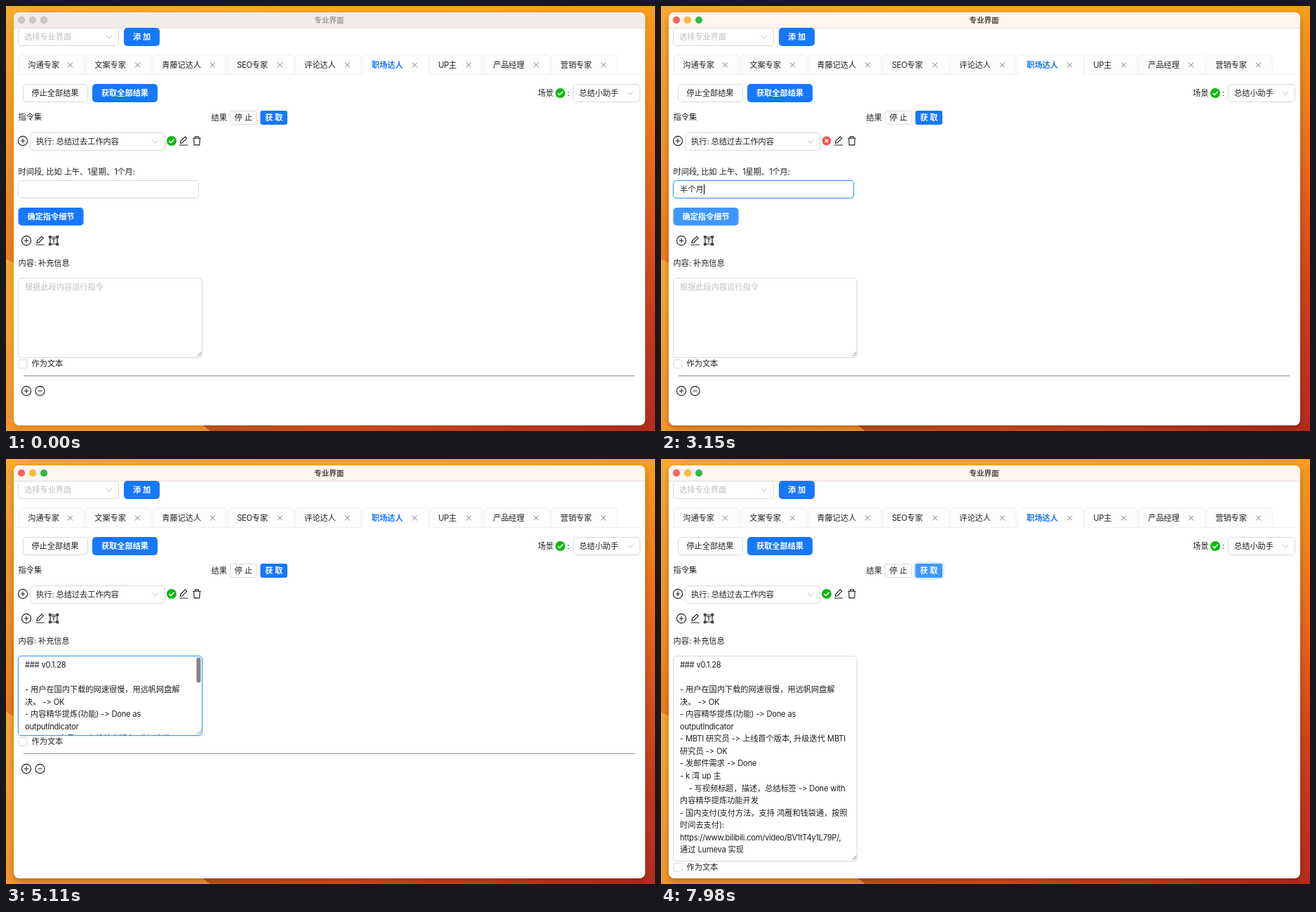
An HTML page for the animation above (8 s loop, 925 by 605 pixels).

```html
<!DOCTYPE html>
<html lang="zh-CN">
<head>
<meta charset="utf-8">
<style>
  html, body { margin: 0; width: 925px; height: 605px; overflow: hidden; background: #f5a02a; }
  svg { display: block; }
  text { font: 11.2px Inter, "Noto Sans CJK SC", sans-serif; fill: #1f1f1f; }
  .latin { letter-spacing: -.28px; }
  .mid { text-anchor: middle; }
  .bold { font-weight: 600; }
  .white { fill: #fff; }
  .hint { fill: #bfbfbf; }
  .blue { fill: #1677ff; }
  .box { fill: #fff; stroke: #d9d9d9; }
  .ring { fill: none; stroke: #0591ff; stroke-width: 4; opacity: 0; }
  .icon { fill: none; stroke: #1f1f1f; stroke-width: 1.15; }
  .grey { fill: none; stroke: #bfbfbf; }
</style>
</head>
<body>
<svg id="stage" width="925" height="605"></svg>
<script>
const PERIOD = 8000, STEP = 70;
const $ = id => document.getElementById(id);
const latin = s => s.replace(/[!-~]+/g, m => `<tspan class="latin">${m}</tspan>`);
// y is the middle of the line
const text = (x, y, s, cls = '', more = '') =>
  `<text x="${x}" y="${y + 4}" class="${cls}" ${more}>${latin(s)}</text>`;
const rect = (x, y, w, h, rx, attrs) =>
  `<rect x="${x}" y="${y}" width="${w}" height="${h}" rx="${rx}" ${attrs}/>`;
const box = (x, y, w, h, id = '', rx = 4.5) =>
  rect(x + .5, y + .5, w - 1, h - 1, rx, `class="box" id="${id}"`);
const ring = (x, y, w, h, id, rx = 4.5) =>
  rect(x + .5, y + .5, w - 1, h - 1, rx, `class="ring" id="${id}"`);
const button = (x, y, w, h, s, id = '', rx = 5) =>
  rect(x, y, w, h, rx, `class="blue" id="${id}"`) + text(x + w / 2, y + h / 2, s, 'mid bold white');
const path = (x, y, d, cls = 'icon') => `<path transform="translate(${x} ${y})" class="${cls}" d="${d}"/>`;
const chevron = (x, y) => path(x, y, 'M-4-2L0 2.3 4-2', 'grey');
const select = (x, y, w, s, cls) =>
  box(x, y, w, 26) + text(x + 9, y + 13, s, cls) + chevron(x + w - 14, y + 13);

const ROUND = 'M-6.6 0A6.6 6.6 0 1 1 6.6 0A6.6 6.6 0 1 1-6.6 0M-3.2 0H3.2';
const plus = (x, y) => path(x, y, ROUND + 'M0-3.2V3.2');
const minus = (x, y) => path(x, y, ROUND);
const pen = (x, y) => path(x, y, 'M-6 6H6.3M-4.5 3.2L-4 .4 2.4-6 4.7-3.7-1.7 2.7z');
const trash = (x, y) =>
  path(x, y, 'M-5.8-3.8H5.8M-2.5-3.8V-5.9H2.5V-3.8M-4.3-3.8L-3.8 5.9H3.8L4.3-3.8');
const textBox = (x, y) => path(x, y,
  'M-5-5H5V5H-5zM-3-2.8H3M0-2.8V3M-6.5-6.5h2.5v2.5h-2.5zM4-6.5h2.5v2.5h-2.5zM-6.5 4h2.5v2.5h-2.5zM4 4h2.5v2.5h-2.5z');
const badge = (x, y, r, fill, d) =>
  `<circle cx="${x}" cy="${y}" r="${r}" fill="${fill}"/>` +
  `<path transform="translate(${x} ${y})" fill="none" stroke="#fff" stroke-width="1.6" d="${d}"/>`;
const tick = (x, y) => badge(x, y, 7, '#0cb80f', 'M-3.5 .1L-1 2.7 3.6-2.4');
const cross = (x, y) => badge(x, y, 6.4, '#f2524e', 'M-2.2-2.2l4.4 4.4m0-4.4l-4.4 4.4');

const gradient = (id, vertical, ...colors) =>
  `<linearGradient id="${id}" x2="${vertical ? 0 : 1}" y2="${vertical ? 1 : 0}">` +
  colors.map((c, i) => `<stop offset="${i / (colors.length - 1)}" stop-color="${c}"/>`).join('') +
  '</linearGradient>';

const tabs = [[18, 93, '沟通专家'], [113, 94, '文案专家'], [209, 105, '青藤记达人'], [316, 94, 'SEO专家'],
  [412, 94, '评论达人'], [508, 94, '职场达人'], [603, 76, 'UP主'], [681, 94, '产品经理'], [777, 94, '营销专家']];
const tab = ([x, w, s], i) => {
  const active = i === 5;
  return `<path d="M${x + .5} 97.5V75q0-5.5 5.5-5.5H${x + w - 5.5}q5.5 0 5.5 5.5V97.5" ` +
    `fill="${active ? '#fff' : '#fdfdfd'}" stroke="#f0f0f0"/>` +
    (active ? '' : `<path d="M${x} 97.5H${x + w}" stroke="#f0f0f0"/>`) +
    text(x + 13.2, 84, s, active ? 'bold blue' : '') +
    path(x + w - 19.5, 84, 'M-3.4-3.4L3.4 3.4M3.4-3.4L-3.4 3.4" stroke="#777', '');
};

const notes = `### v0.1.28

- 用户在国内下载的网速很慢，用远帆网盘解
决。 -> OK
- 内容精华提炼(功能) -> Done as
outputIndicator
- MBTI 研究员 -> 上线首个版本, 升级迭代 MBTI
研究员 -> OK
- 发邮件需求 -> Done
- k 湾 up 主
\u00a0\u00a0\u00a0\u00a0- 写视频标题，描述，总结标签 -> Done with
内容精华提炼功能开发
- 国内支付(支付方法，支持 鸿雁和钱袋通，按照
时间去支付):
https://www.bilibili.com/video/BV1tT4y1L79P/,
通过 Lumeva 实现`.split('\n');

$('stage').innerHTML = `
<defs>
  ${gradient('top', 0, '#f7a52c', '#fba624', '#fca31f', '#f99d1c')}
  ${gradient('left', 1, '#f8ab2f', '#f39724', '#ec7a1c')}
  ${gradient('left2', 1, '#f8a92d', '#f3982a')}
  ${gradient('right', 1, '#f99f1d', '#ee7c1b', '#de581b', '#c63b1c', '#b42d1b')}
  ${gradient('bottom', 0, '#c2551c', '#d5501d', '#c63f1c', '#b42d1b')}
  <clipPath id="frame">${rect(11, 9, 900, 588, 8, '')}</clipPath>
</defs>
${rect(0, 0, 925, 605, 0, 'fill="url(#top)"')}
${rect(0, 0, 30, 370, 0, 'fill="url(#left)"')}
<path d="M0 360L30 376V590H300V605H0z" fill="url(#left2)"/>
<path d="M272 590L291 605H925V590z" fill="url(#bottom)"/>
${rect(900, 0, 25, 605, 0, 'fill="url(#right)"')}
${rect(11, 9, 900, 588, 8, 'fill="#fff" id="window"')}
<g clip-path="url(#frame)">
  ${rect(11, 9, 900, 22, 0, 'id="bar"')}
  <path d="M11 31.5H911" stroke="#e6dfdb"/>
  ${[22, 38, 54].map((x, i) => `<circle id="dot${i}" cx="${x}" cy="20" r="4.9" stroke="#0002" stroke-width=".6"/>`).join('')}
  ${text(460.5, 19.5, '专业界面', 'mid', 'id="title" style="font-size:10.6px;font-weight:700"')}
  ${select(17, 31, 144, '选择专业界面', 'hint')}
  ${button(168, 31, 51, 26, '添 加')}
  <path d="M17 97.5H508M602 97.5H904" stroke="#f0f0f0"/>
  ${tabs.map(tab).join('')}
  ${box(24, 111, 93, 26)}${text(70, 124, '停止全部结果', 'mid')}
  ${button(123, 111, 93, 26, '获取全部结果')}
  ${text(758, 124, '场景')}${tick(790, 124)}${text(800, 124, ':')}
  ${select(808, 111, 96, '总结小助手')}
  ${text(17.5, 158, '指令集')}${text(292.5, 159, '结果')}
  ${box(319, 149, 39, 20, '', 3)}${text(338.5, 159, '停 止', 'mid')}
  ${ring(362.5, 149, 39, 20, 'pulse', 3)}${button(362.5, 149, 38.5, 20, '获 取', 'fetch', 3)}
  ${plus(24, 192)}${select(34, 180, 193, '执行: 总结过去工作内容')}
  <g id="valid">${tick(236, 192)}</g><g id="invalid">${cross(236, 192)}</g>
  ${pen(253, 192)}${trash(272, 192)}
  <g id="details">
    ${text(17.5, 236, '时间段, 比如 上午、1星期、1个月:')}
    ${ring(17, 248, 258, 26, 'inputRing')}${box(17, 248, 258, 26, 'input')}
    ${text(27, 261, '', '', 'id="value"')}
    <path id="underline" stroke="#333"/><path id="caret" stroke="#000"/>
    ${button(17.5, 287, 93, 25.5, '确定指令细节', 'confirm')}
  </g>
  <g id="lower">
    ${plus(29, 334)}${pen(48.5, 334)}${textBox(68, 334)}
    ${text(17.5, 366, '内容: 补充信息')}
    ${ring(17, 387, 263, 114, 'areaRing')}${box(17, 387, 263, 114, 'area')}
    ${text(27, 400, '根据此段内容运行指令', 'hint', 'id="hint"')}
    <svg id="view" x="18" y="388" width="261" height="112">
      <g id="notes">
        ${notes.map((s, i) => text(9, 12 + 17.55 * i, s)).join('')}
        <path id="endCaret" d="M91.5 268V282" stroke="#000"/>
      </g>
      ${rect(253.5, 0, 6, 36, 3, 'id="thumb" fill="#858585"')}
    </svg>
    <path id="areaCaret" d="M27.5 393V407" stroke="#000"/>
    <g id="below">
      <path d="M272.5 498.5l6-6M275.5 498.5l3-3" stroke="#777" stroke-width=".9"/>
      ${box(17.5, 503, 13, 13, '', 2.5)}${text(36.5, 509, '作为文本')}
      <path d="M25 526.5H896" stroke="#929292"/>
      ${plus(29, 548)}${minus(48.5, 548)}
    </g>
  </g>
</g>
<g id="popup">
  ${rect(14, 272.5, 328, 26.5, 6, 'fill="#fff" stroke="#ddd" stroke-width=".6" style="filter:drop-shadow(0 2px 4px #0005)"')}
  <g id="choices"></g>
  ${path(329, 285.5, 'M-4-2L0 2.2 4-2')}
</g>`;

// time, typed text, candidates offered
const typing = [
  [0, '', ''],
  [1400, 'b', '不 吧 把 被 并 比'],
  [1470, 'ba', '把 吧 八 爸 拔 罢'],
  [1540, 'ban', '半 办 班 版 般 搬'],
  [1820, 'ban g', '半个 办公 办个 帮 半 办'],
  [1890, 'ban ge', '半个 办个 版个 半 办 帮'],
  [2170, 'ban ge y', '半个与 半个与你 办个 半个 帮 半'],
  [2310, 'ban ge yu', '半个与 半个鱼 办个 半个 帮 半'],
  [2380, 'ban ge yue', '半个月 办个月 半个 办个 半 办'],
  [2520, '半个月', '']
];
// time, growth of the text area
const growth = [[6020, 0], [6090, 2], [6300, 11], [6440, 32], [6580, 112], [6650, 154], [6720, 179]];
const scrolling = [[4830, 178], [4900, 150], [4970, 85], [5040, 25], [5110, 0]];

const show = (id, on) => $(id).style.display = on ? '' : 'none';
const ramp = (t, a, b) => Math.min(1, Math.max(0, (t - a) / (b - a)));
const mix = (a, b, p) => `color-mix(in srgb, ${b} ${p * 100}%, ${a})`;
const along = (points, t) => points.reduce((v, [time, next], i) => {
  const [before, prev] = points[i - 1] || [time - 1, next];
  return t > before ? prev + (next - prev) * ramp(t, before, time) : v;
}, points[0][1]);
const shiftY = (id, y) => $(id).setAttribute('transform', `translate(0 ${y})`);

function choices(list) {
  let x = 19;
  return list.split(' ').map((word, i) => {
    const w = 8 + 12.8 * word.length, cls = i ? '' : 'white';
    const part = (i ? '' : rect(16, 275, w + 8, 22, 4, 'fill="#0b5fd8"')) +
      text(x, 285.5, String(i + 1), cls, `style="font-size:9.5px;${i ? 'fill:#777' : ''}"`) +
      text(x + 8, 286, word, cls, `style="font-size:12.8px;${i ? 'fill:#444' : ''}"`);
    x += w + 12;
    return part;
  }).join('');
}

function draw(t) {
  const focused = t >= 70, collapsed = t >= 3360;
  $('bar').style.fill = focused ? '#fef5ef' : '#f1ecea';
  $('title').style.fill = focused ? '#4b4644' : '#a39d9a';
  ['#fe5f57', '#febb2e', '#29bd3c'].forEach((c, i) => $('dot' + i).style.fill = focused ? c : '#cec8c5');
  $('window').style.filter = `drop-shadow(0 4px 5px rgba(60,10,0,${focused ? .32 : .16}))`;

  const [, value, list] = typing.findLast(([start]) => t >= start);
  $('value').innerHTML = latin(value);
  const end = 27 + (value ? $('value').getComputedTextLength() : 0);
  $('caret').setAttribute('d', `M${Math.round(end) + .5} 254V268`);
  show('caret', t >= 770 && t < 3290);
  $('underline').setAttribute('d', `M27 266.5H${end}`);
  show('underline', list);
  show('popup', list);
  $('choices').innerHTML = list ? choices(list) : '';
  const wrong = t >= 1400 && t < 3290;
  show('valid', !wrong);
  show('invalid', wrong);

  const inputFocus = ramp(t, 630, 980) - ramp(t, 3220, 3430);
  $('input').style.stroke = mix('#d9d9d9', '#4096ff', inputFocus);
  $('inputRing').style.opacity = .12 * inputFocus;
  $('confirm').style.fill = mix('#1677ff', '#4096ff', ramp(t, 2870, 3150));
  show('details', !collapsed);

  const grow = along(growth, t), scroll = along(scrolling, t), pasted = t >= 4410;
  const blur = ramp(t, 7630, 7910);
  shiftY('lower', collapsed ? -107 : 0);
  shiftY('below', grow);
  $('area').setAttribute('height', 113 + grow);
  $('areaRing').setAttribute('height', 113 + grow);
  $('view').setAttribute('height', 112 + grow);
  $('area').style.stroke = mix('#d9d9d9', '#4096ff', ramp(t, 3570, 3850) - blur);
  $('areaRing').style.opacity = .12 * (ramp(t, 3780, 4060) - blur);
  show('hint', !pasted);
  show('notes', pasted);
  shiftY('notes', -scroll);
  $('thumb').setAttribute('y', 1.5 + scroll / 178 * 60);
  $('thumb').style.opacity = pasted ? 1 - ramp(t, 5530, 5810) : 0;
  show('areaCaret', t >= 3850 && !pasted);
  show('endCaret', t < 4900 || t >= 6720 && t < 7070);

  $('fetch').style.fill = mix('#1677ff', '#4096ff', ramp(t, 7420, 7700));
  const pulse = ramp(t, 7770, 7980);
  $('pulse').style.opacity = .18 * Math.sign(pulse);
  $('pulse').style.strokeWidth = 6 * pulse;
}

let last = -1;
function tick60() {
  const t = Math.floor(performance.now() % PERIOD / STEP) * STEP;
  if (t !== last) draw(last = t);
  requestAnimationFrame(tick60);
}
tick60();
</script>
</body>
</html>
```
